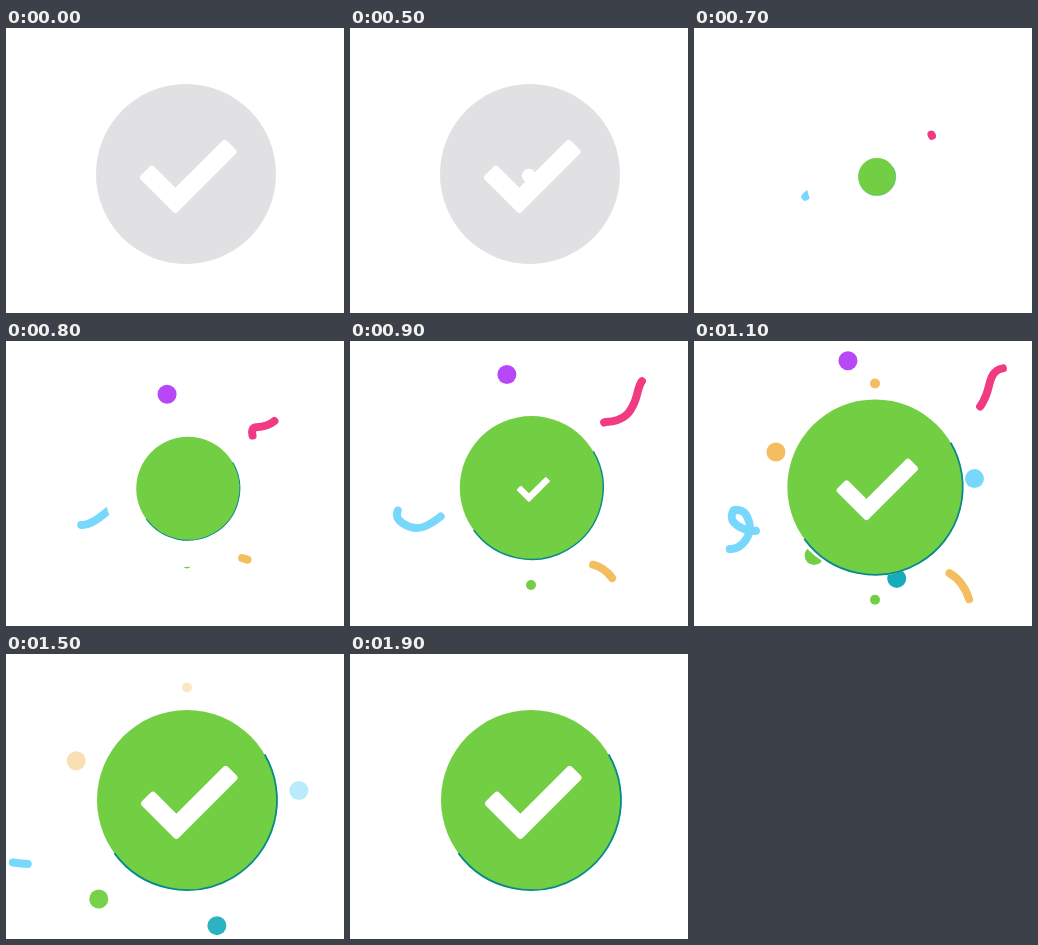
These frames come from a looping animation (338 by 285 pixels, 2.5 s). An HTML page with a canvas:

```html
<!DOCTYPE html>
<html lang="en">
<head>
<meta charset="utf-8">
<title>Confirmed</title>
<style>
  html, body { margin: 0; width: 100%; height: 100%; overflow: hidden; background: #fff; }
  canvas { display: block; }
</style>
</head>
<body>
<canvas id="stage" width="338" height="285"></canvas>
<script>
const ctx = document.getElementById('stage').getContext('2d');
const LOOP = 2500, STEP = 100;
const CX = 181, CY = 147;
const GREEN = '#72cf43', ORANGE = '#f3bd60', SKY = '#78d8fb', PINK = '#f03a82',
      PURPLE = '#b847f8', TEAL = '#17acbb', EDGE = '#088a8c', GREY = '#e1e0e2';

const clamp = v => Math.max(0, Math.min(1, v));

// Scale from 0 to 1, shared by the discs and the check mark.
const grow = (t, born) => 1 - (1 - clamp((t - born) / 737)) ** 4;

// Dots shoot out from the centre: colour, radius, angle, reach, time of birth.
const dots = [
  [PURPLE, 9.5, -102, 134, 633],
  [GREEN, 5, 90, 116, 660],
  [ORANGE, 5, -90, 114, 770],
  [ORANGE, 9.5, 200, 118.5, 807],
  [SKY, 9.5, -5.4, 113, 813],
  [TEAL, 9.5, 76.5, 130, 933],
  [GREEN, 9.5, 132, 134, 949]
];

// The head runs along the path at a steady speed; the tail catches up.
const ribbons = [
  { color: PINK, length: 94, speed: 0.38, born: 680, chase: 500,
    path: 'M257 102 Q247 82 256 81 C276 80 281 70 285 60 S288 37 301 35' },
  { color: SKY, length: 145, speed: 0.29, born: 680, chase: 720,
    path: 'M96 171 C81 184 73 188 65 187 S46 180 47 173 S50 167 55 168 S64 177 64 184 S58 203 47 204 S30 204 22 203' },
  { color: ORANGE, length: 43, speed: 0.2, born: 765, chase: 680,
    path: 'M240 223 Q261 227 269 251' }
];
for (const r of ribbons) r.path = new Path2D(r.path);

function disc(x, y, r, color) {
  ctx.fillStyle = color;
  ctx.beginPath();
  ctx.arc(x, y, r, 0, 2 * Math.PI);
  ctx.fill();
}

// Runs paint with the origin moved to x, y and scaled.
function scaled(x, y, scale, paint) {
  if (scale <= 0) return;
  ctx.save();
  ctx.translate(x, y);
  ctx.scale(scale, scale);
  paint();
  ctx.restore();
}

// Two rounded bars at a right angle.
function check(x, y) {
  ctx.save();
  ctx.translate(x, y);
  ctx.rotate(-Math.PI / 4);
  ctx.beginPath();
  ctx.roundRect(-36, 2.2, 88.4, 18.8, 3.5);
  ctx.roundRect(-36, -31, 18.8, 52, 3.5);
  ctx.fillStyle = '#fff';
  ctx.fill();
  ctx.restore();
}

function dot([color, r, angle, reach, born], t) {
  if (t < born) return;
  const a = angle * Math.PI / 180, d = reach * (1 - Math.exp((born - t) / 133));
  ctx.globalAlpha = 1 - clamp((t - born - 540) / 300);
  disc(CX + d * Math.cos(a), CY + d * Math.sin(a), r, color);
  ctx.globalAlpha = 1;
}

function ribbon({ color, path, length, speed, born, chase }, t) {
  const head = Math.min(length, speed * (t - born));
  const tail = length * clamp((t - chase) / 820) ** 2;
  if (tail >= head) return;
  const spread = 1.1 - 0.1 * Math.exp((900 - t) / 170);
  scaled(CX, CY, spread, () => {
    ctx.translate(-CX, -CY);
    ctx.setLineDash([head - tail, 999]);
    ctx.lineDashOffset = -tail;
    ctx.lineCap = 'round';
    ctx.lineWidth = 8 / spread;
    ctx.strokeStyle = color;
    ctx.stroke(path);
  });
}

function badge() {
  disc(-2.4, -3.5, 90, GREEN);
  ctx.beginPath();
  ctx.arc(-2.4, -3.5, 90, -0.53, 2.51);
  ctx.strokeStyle = EDGE;
  ctx.lineWidth = 1.8;
  ctx.stroke();
}

function draw(t) {
  ctx.fillStyle = '#fff';
  ctx.fillRect(0, 0, 338, 285);
  if (t < 700) {
    disc(180, 146, 90, GREY);
    check(180, 146);
  }
  ribbons.forEach(r => ribbon(r, t));
  dots.forEach(d => dot(d, t));
  scaled(179, 148, grow(t, 485), () => disc(-1, -2, 89.5, '#fff'));
  scaled(183.4, 149.5, grow(t, 658), badge);
  scaled(183.4, 148.5, grow(t, 827), () => check(-2.4, -2.5));
}

// The motion runs at ten steps per second.
const start = performance.now();
function tick() {
  const t = (performance.now() - start) % LOOP;
  draw(Math.floor(t / STEP) * STEP);
  requestAnimationFrame(tick);
}
tick();
</script>
</body>
</html>
```
